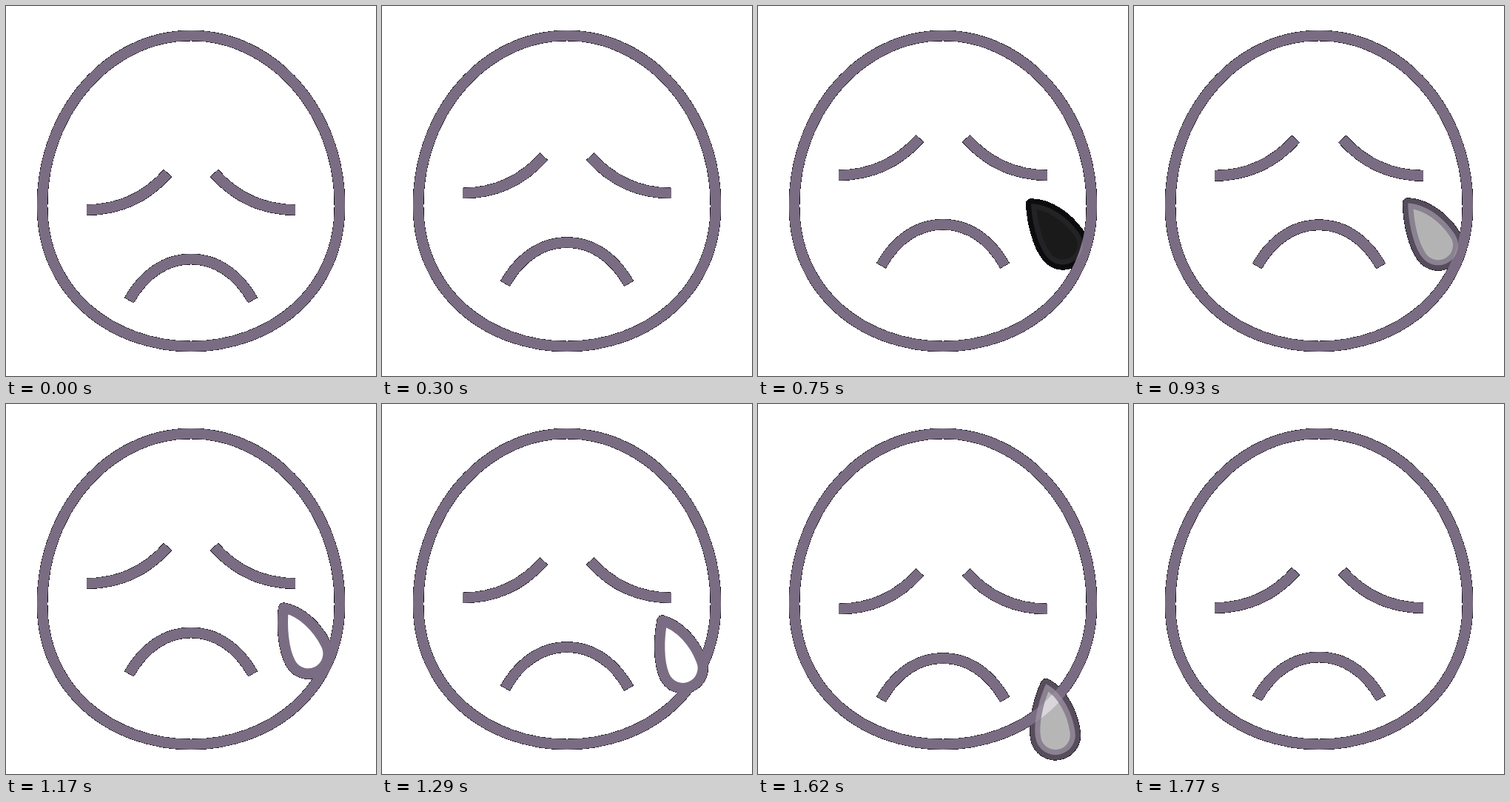
Write an HTML page with a canvas that moves like this. It is 500 px wide and 500 px high and loops after 3.84 s.

```html
<!DOCTYPE html>
<html lang="en">
<head>
<meta charset="utf-8">
<title>Sad face with a tear</title>
<style>
  html, body { margin: 0; height: 100%; overflow: hidden; background: #fff; }
  canvas { display: block; width: 100%; height: 100%; }
</style>
</head>
<body>
<canvas id="stage" width="500" height="500"></canvas>
<script>
const LOOP = 3840, STEP = 30, REST = 1770, SIZE = 500;
const FAINTEST = 10; // lowest alpha that still shows

const outline = new Path2D(
  'M250 40C361 40 451 143 451 270C451 388 356.5 460 250 460' +
  'C143.5 460 49 388 49 270C49 143 139 40 250 40Z');
const features = new Path2D(
  'M109 275.5C155 275.5 191 257 218.5 226' +
  'M391 275.5C345 275.5 309 257 281.5 226' +
  'M166.5 397.5C187 361 217 342 250 342S313 361 333.5 397.5');
// Bulb centred on the origin, tip pointing up
const tear = new Path2D('M0 -70C20 -54 28 -24 27 0A27 27 0 0 1 -27 0C-27 -21 -14 -50 0 -70Z');

// Progress of t between two times, from 0 to 1
const linear = (t, from, to) => Math.max(0, Math.min(1, (t - from) / (to - from)));
const ease = (t, from, to) => (1 - Math.cos(Math.PI * linear(t, from, to))) / 2;

const ctx = document.getElementById('stage').getContext('2d', { willReadFrequently: true });

// One-bit transparency: soft edges and fades blend with black
function hardenAlpha() {
  const image = ctx.getImageData(0, 0, SIZE, SIZE), d = image.data;
  for (let i = 0; i < d.length; i += 4) {
    const alpha = d[i + 3];
    if (alpha === 255) continue;
    for (let c = i; c < i + 3; c++) d[c] *= alpha / 255;
    d[i + 3] = alpha < FAINTEST ? 0 : 255;
  }
  ctx.putImageData(image, 0, 0);
}

function drawFeatures(t) {
  const rise = 45 * ease(t, 0, 600);
  const hover = 2 * Math.sin(Math.PI * linear(t, 600, 1020));
  const fall = 48 * ease(t, 1020, 1470);
  const settle = 3 * ease(t, 1470, REST);
  ctx.save();
  ctx.translate(0, fall - rise - hover - settle);
  ctx.stroke(features);
  ctx.restore();
}

function drawTear(t) {
  const opacity = linear(t, 720, 1020) * (1 - linear(t, 1560, REST));
  if (opacity === 0) return;
  // The tear slides slowly at first, drops, then slows down while it straightens
  const swing = Math.sin(Math.PI / 2 * linear(t, 720, 1740) ** 1.9);
  ctx.save();
  ctx.globalAlpha = opacity;
  ctx.translate(411.8 - 10.5 * swing, 322.5 + 139.5 * swing ** 2);
  ctx.rotate((29 * swing - 37.8) * Math.PI / 180);
  ctx.fill(tear);
  ctx.stroke(tear);
  ctx.restore();
}

function draw(t) {
  ctx.clearRect(0, 0, SIZE, SIZE);
  ctx.stroke(outline);
  drawFeatures(t);
  drawTear(t);
  hardenAlpha();
}

ctx.lineWidth = 14;
ctx.lineJoin = 'round';
ctx.strokeStyle = '#7a6d83';
ctx.fillStyle = '#fff';

let shown = -1;
function tick() {
  const now = performance.now() % LOOP;
  const t = Math.min(REST, Math.floor(now / STEP) * STEP);
  if (t !== shown) draw(shown = t);
  requestAnimationFrame(tick);
}
tick();
</script>
</body>
</html>
```
